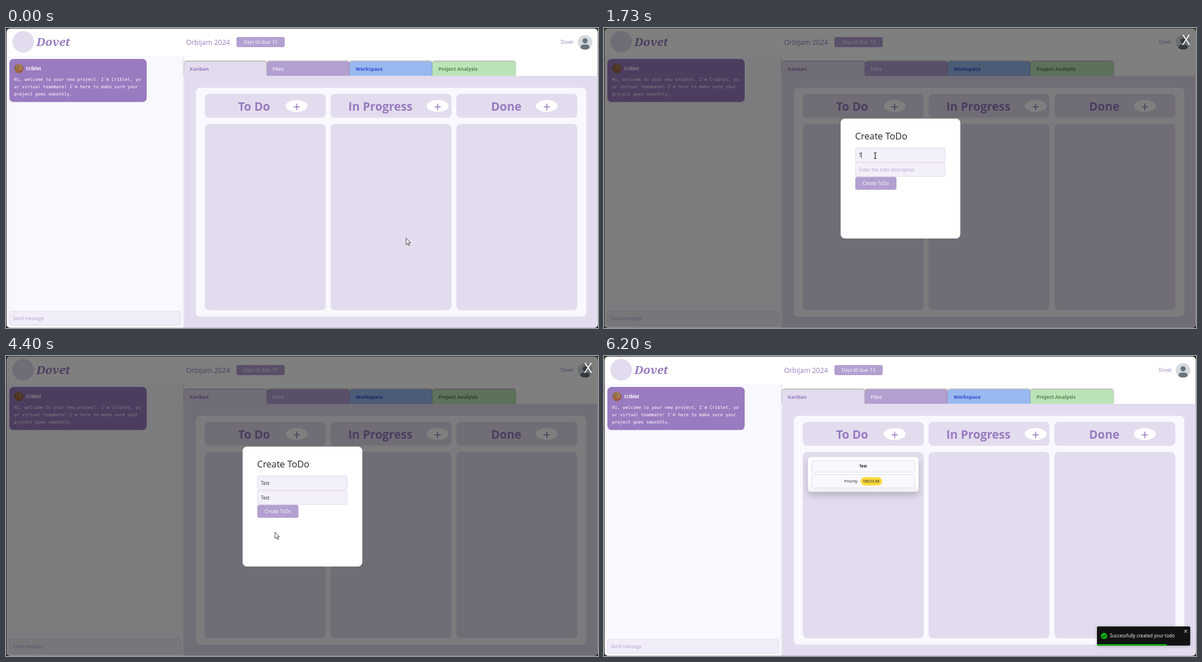
An HTML page that plays this animation: 1052x533 px, repeating every 6270 ms.

```html
<!DOCTYPE html>
<html lang="en">
<head>
<meta charset="utf-8">
<title>Kanban board</title>
<style>
  html, body { margin: 0; width: 100%; height: 100%; overflow: hidden; background: #262626; }
  svg { display: block; width: 100vw; height: 100vh; }
  text { font: 8.15px "Open Sans", "Noto Sans", sans-serif; white-space: pre; }
  .mid { text-anchor: middle; }
  .lav { fill: #e3dcee; }
  .mauve { fill: #b3a0d1; }
  .purple { fill: #997bc0; }
  .white { fill: #fff; }
  .pale { fill: #f9f8fe; }
  .field { fill: #f3f0f9; stroke: #e0d8ec; }
  .tab { filter: drop-shadow(.5px -1px 1.2px rgba(0, 0, 0, .42)); }
  .tabs text { font-size: 8.8px; font-weight: 700; }
  .heads text { font-size: 20.7px; font-weight: 700; }
  .heads .plus { font-size: 23px; font-weight: 400; }
  .mono text { font: 7.8px "DejaVu Sans Mono", monospace; }
  .typed { fill: #2a2733; }
  .caret { stroke: #222; stroke-width: .8; }
  .card { filter: drop-shadow(0 6px 6px rgba(0, 0, 0, .2)); }
  .box { fill: #f9f8fe; stroke: #d3d1dc; stroke-width: .7; }
  .toast { filter: drop-shadow(0 1px 3px rgba(0, 0, 0, .2)); }
  .line { fill: none; stroke-linecap: round; stroke-linejoin: round; }
</style>
</head>
<body>
<svg viewBox="0 0 1052 533" preserveAspectRatio="none">
  <defs>
    <clipPath id="win"><rect x="1" y="1" width="1050.6" height="531.6" rx="6"/></clipPath>
    <clipPath id="face"><circle cx="1029" cy="25.5" r="13"/></clipPath>
    <linearGradient id="sheet" x2="0" y2="1">
      <stop offset=".7" stop-color="#fff"/><stop offset="1" stop-color="#efeff1"/>
    </linearGradient>
    <linearGradient id="edge">
      <stop stop-color="#000" stop-opacity="0"/><stop offset="1" stop-color="#000" stop-opacity=".07"/>
    </linearGradient>
  </defs>

  <g clip-path="url(#win)">
    <rect class="white" width="1052" height="533"/>

    <!-- header -->
    <circle class="lav" cx="30.5" cy="24.5" r="19.2"/>
    <text class="purple" x="54" y="31.5" style="font:italic 900 20.5px 'Noto Serif',serif">Dovet</text>
    <text class="purple" x="320" y="29.6" style="font-size:12.3px">Orbijam 2024</text>
    <rect class="mauve" x="409.5" y="16" width="85.8" height="18" rx="3.5"/>
    <text class="white mid" x="452.3" y="28.2">Days till due: 13</text>
    <text class="purple" x="1008" y="28.2" text-anchor="end">Dovet</text>
    <g clip-path="url(#face)">
      <rect x="1016" y="12" width="27" height="27" fill="#d6dbe0"/>
      <g fill="#68747e">
        <circle cx="1029" cy="22.8" r="4.6"/>
        <rect x="1021" y="29.4" width="16" height="9" rx="5"/>
      </g>
    </g>

    <!-- chat -->
    <rect class="pale" y="50" width="316.5" height="483"/>
    <rect x="313" y="50" width="3.5" height="483" fill="url(#edge)"/>
    <rect class="purple" x="6" y="55" width="244" height="76.6" rx="7.5"/>
    <circle cx="23" cy="72" r="8.2" fill="#8a5a3c"/>
    <g id="dots"></g>
    <text class="white" x="35.8" y="75" style="font-size:7.9px;font-weight:700">Criblet</text>
    <g class="mono white">
      <text x="14.2" y="93.7">Hi, welcome to your new project. I'm Criblet, yo</text>
      <text x="14.2" y="106.7">ur virtual teammate! I'm here to make sure your</text>
      <text x="14.2" y="119.5">project goes smoothly.</text>
    </g>
    <rect class="field" x="6.2" y="503.2" width="304" height="24.6" rx="3" style="fill:#f1edf8"/>
    <text class="mauve" x="12.3" y="519">Send message</text>

    <!-- tabs -->
    <g class="tabs">
      <g class="tab"><path class="lav" d="M316.7 85V64q0-4.5 4.5-4.5H459q4.500 0 4.500 4.500V85Z"/></g>
      <g class="tab"><path class="mauve" d="M463.700 85V64q0-4.500 4.500-4.500H606q4.500 0 4.500 4.500V85Z"/></g>
      <g class="tab"><path fill="#98b9f0" d="M610.800 85V64q0-4.500 4.500-4.500H753q4.500 0 4.500 4.500V85Z"/></g>
      <g class="tab"><path fill="#bce3b8" d="M757.800 85V64q0-4.500 4.500-4.500H901q4.500 0 4.500 4.500V85Z"/></g>
      <text class="purple" x="326.600" y="75.800">Kanban</text>
      <text x="473.800" y="75.800" fill="#e8e0f2">Files</text>
      <text x="621.300" y="75.800" fill="#3b4cd2">Workspace</text>
      <text x="768.500" y="75.800" fill="#5d8453">Project Analysis</text>
    </g>

    <!-- board -->
    <rect class="lav" x="316.5" y="85" width="736" height="448"/>
    <rect class="pale" x="337.3" y="106.300" width="694" height="406.500" rx="8"/>
    <g class="heads" id="columns"></g>

    <g id="card">
      <rect class="card" x="362.300" y="179.500" width="196.800" height="62" rx="5" fill="url(#sheet)"/>
      <rect class="box" x="368.700" y="186" width="183.800" height="20.300" rx="4"/>
      <rect class="box" x="368.700" y="210.300" width="183.800" height="24.200" rx="4"/>
      <text class="mid" x="460.600" y="198.300" fill="#111" style="font-size:6.5px;font-weight:700">Test</text>
      <text x="427" y="225" fill="#222" style="font-size:6.9px">Priority:</text>
      <rect x="456" y="215.300" width="38.300" height="14.600" rx="7.300" fill="#fbdb3c"/>
      <text class="mid" x="475.200" y="225.100" fill="#222" style="font-size:7.100px">MEDIUM</text>
    </g>

    <!-- dialog -->
    <g id="modal">
      <rect width="1052" height="533" fill="#000" fill-opacity=".5"/>
      <text class="white mid" x="1034.500" y="30" style="font-size:25px">X</text>
      <rect class="white" x="420.500" y="161" width="212.700" height="213" rx="7.500"/>
      <text x="446.300" y="198.300" fill="#212529" style="font-size:16.200px">Create ToDo</text>
      <rect class="field" x="447" y="213" width="159" height="25.200" rx="3"/>
      <rect class="field" x="447" y="239" width="159" height="24.800" rx="3"/>
      <text id="title" x="453" y="229"></text>
      <text id="about" x="453" y="254.600"></text>
      <path id="caret" class="caret"/>
      <rect class="mauve" x="446.500" y="264.500" width="73.200" height="23" rx="3.500"/>
      <text class="white mid" x="483.100" y="279">Create ToDo</text>
    </g>

    <!-- notice -->
    <g id="toast" class="toast">
      <rect x="876" y="480.500" width="165.700" height="34" rx="2" fill="#121212"/>
      <rect id="bar" x="876" y="512" width="165.500" height="2.400" fill="#07bc0c"/>
      <circle cx="888.600" cy="497.300" r="5.500" fill="#07bc0c"/>
      <path class="line" d="M886 497.500l1.900 1.900 3.400-4" stroke="#121212" stroke-width="1.300"/>
      <text class="white" x="899" y="500.200">Successfully created your todo</text>
      <path class="line" d="M1031.600 486.800l4.400 4.400m0-4.400l-4.400 4.400" stroke="#c8c8c8" stroke-width="1.100"/>
    </g>

    <g id="pointer">
      <path id="arrow" class="white" d="M0 0V11.300L2.600 8.900 4.400 13 6.200 12.200 4.500 8.200H8Z" stroke="#111" stroke-width=".8"/>
      <path id="beam" class="line" d="M-2-4.700H-.5L0-4.200 .5-4.700H2M0-4.200V4.700M-2 5.200H-.5L0 4.700 .5 5.200H2" stroke="#111" stroke-width="1.100"/>
      <path id="hand" class="white line" d="M-1 7V.8Q0-.6 1 .8V5L5 5.800Q6 6.200 6 7.300L5 12.500H-1L-4 8.200Q-4 6.200-2.500 6.800Z" style="fill:#fff" stroke="#111" stroke-width=".8"/>
    </g>
  </g>
</svg>

<script>
const LOOP = 6270, STEP = 1000 / 15;
const $ = id => document.getElementById(id);
const show = (id, on) => $(id).style.display = on ? '' : 'none';

// Column heads: name, left edge, name centre, button centre
$('columns').innerHTML = [
  ['To Do', 353.2, 441, 516.5],
  ['In Progress', 576.6, 665.2, 767],
  ['Done', 800.2, 889, 961]
].map(([name, x, mid, plus]) => `
  <rect class="lav" x="${x}" y="117" width="215" height="42.6" rx="8"/>
  <rect class="lav" x="${x}" y="170.5" width="215" height="331" rx="8"/>
  <text class="purple mid" x="${mid}" y="146.600">${name}</text>
  <ellipse class="white" cx="${plus}" cy="138.500" rx="19.400" ry="10.600"/>
  <text class="purple mid plus" x="${plus}" y="149.200">+</text>`).join('');

// Sprinkles on the chat avatar
const tints = ['#f4d35e', '#e8574f', '#7fc97f', '#f7f0e6', '#f29b4b'];
$('dots').innerHTML = Array.from({ length: 24 }, (_, i) => {
  const r = 1.5 * Math.sqrt(i), a = i * 2.4;
  return `<circle cx="${23 + r * Math.cos(a)}" cy="${72 + r * Math.sin(a)}" r=".8" fill="${tints[i % 5]}"/>`;
}).join('');

// Pointer: time, x, y
const path = [
  [135, 711, 373.5], [270, 690, 340], [400, 630, 260], [530, 560, 190], [670, 521, 158],
  [800, 514.5, 148], [870, 517.5, 144.5], [930, 517.5, 144.5], [1130, 505, 185], [1270, 488, 215],
  [1400, 482, 226.5], [2070, 482, 226.5], [2200, 479, 240], [2330, 478.5, 251], [2470, 478.5, 251],
  [2600, 478.5, 262], [2740, 478.5, 262], [2930, 478.5, 270], [3070, 478.5, 271.5], [3610, 478.5, 271.5],
  [3800, 482, 300], [3930, 480, 319], [4130, 478, 313], [4400, 478, 313], [4470, 483, 293],
  [4600, 489, 288], [4800, 487, 296], [5000, 484, 300], [5130, 470, 310], [5270, 400, 350],
  [5400, 260, 430], [5530, 121, 505], [5600, 40, 560]
];

function along(keys, t) {
  const i = keys.findIndex(k => k[0] > t);
  if (i < 1) return keys.at(i).slice(1);
  const a = keys[i - 1], b = keys[i], p = (t - a[0]) / (b[0] - a[0]);
  return [a[1] + (b[1] - a[1]) * p, a[2] + (b[2] - a[2]) * p];
}

function drawPointer(t, open) {
  const [x, y] = along(path, t);
  const inside = (top, bottom) => open && x > 447 && x < 606 && y > top && y < bottom;
  const kind = inside(213, 264) ? 'beam' : inside(264, 288) && x < 520 ? 'hand' : 'arrow';
  for (const k of ['arrow', 'beam', 'hand']) show(k, k === kind);
  $('pointer').setAttribute('transform', `translate(${x} ${y})`);
}

const hints = { title: 'Enter the todo title', about: 'Enter the todo description' };
const strokes = { title: [1730, 1870, 1930, 2000], about: [2470, 2800, 2860, 2930] };

function drawField(id, t) {
  const n = strokes[id].filter(s => t >= s - 5).length;
  $(id).textContent = n ? 'Test'.slice(0, n) : hints[id];
  $(id).setAttribute('class', n ? 'typed' : 'mauve');
  return 453.5 + (n ? $(id).getComputedTextLength() - .5 : 0);
}

function drawForm(t) {
  const x1 = drawField('title', t), x2 = drawField('about', t);
  const second = t >= 2260;
  show('caret', t >= 1395 && t < 3395);
  $('caret').setAttribute('d', second ? `M${x2} 245.500v11.500` : `M${x1} 220v11.500`);
}

// Bounce in from the right: start, from, to
const bounce = [[0, 1644, -13.7], [.6, -13.7, 5.5], [.75, 5.5, -2.7], [.9, -2.7, 0]];

function drawToast(t) {
  const p = (t - 4290) / 700;
  show('toast', p >= 0);
  if (p < 0) return;
  let x = 0;
  if (p < 1) {
    const i = bounce.findLastIndex(b => p >= b[0]);
    const [from, a, b] = bounce[i], to = i < 3 ? bounce[i + 1][0] : 1;
    x = b + (a - b) * (1 - (p - from) / (to - from)) ** 3;
  }
  $('toast').setAttribute('transform', `translate(${x} 0)`);
  $('bar').setAttribute('width', 165.5 * (1 - Math.max(0, t - 4985) / 4850));
}

function draw(now) {
  const t = Math.floor((now % LOOP + 5) / STEP) * STEP;
  const open = t >= 925 && t < 4460;
  show('modal', open);
  show('card', t >= 4660);
  if (open) drawForm(t);
  drawToast(t);
  drawPointer(t, open);
  requestAnimationFrame(draw);
}
draw(0);
</script>
</body>
</html>
```
